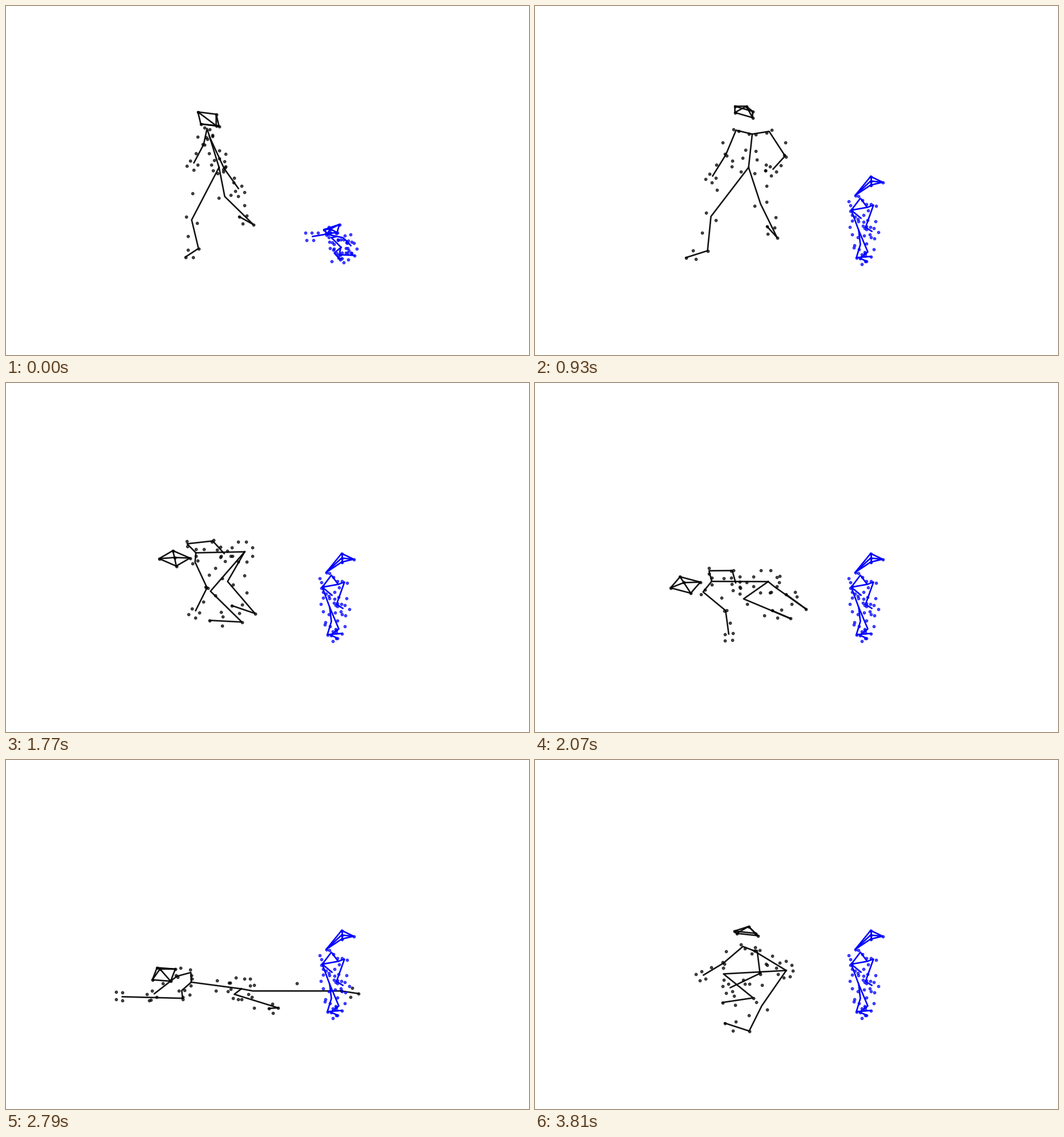
Write a matplotlib script that moves like this. It is 917 px wide and 611 px high and loops after 3.84 s.

```python
import numpy as np
import matplotlib.pyplot as plt
from matplotlib.animation import FuncAnimation
from matplotlib.collections import LineCollection

W, H, DPI = 917, 611, 100
FRAMES, STEP = 128, 30
KEYS = (0, 14, 31, 59, 79, 107, 127)
RISE = 10       # steps the blue figure needs to stand up


def track(*pts, via=None):
    """Smooth path of one joint through its key positions."""
    key = {k: np.array(p, float) for k, p in zip(KEYS, pts)}
    bend = key[59] - key[31]
    key[37] = key[31] + 0.06 * bend      # stand, then drop late
    key[54] = key[31] + 0.55 * bend
    key.update({k: np.array(p, float) for k, p in (via or {}).items()})
    t = np.array(sorted(key), float)
    p = np.array([key[k] for k in t])
    v = np.gradient(p, t, axis=0)
    f = np.arange(FRAMES)
    i = np.clip(np.searchsorted(t, f, side="right") - 1, 0, len(t) - 2)
    h = (t[i + 1] - t[i])[:, None]
    u = (f[:, None] - t[i][:, None]) / h
    return (p[i] * (1 + 2 * u) * (1 - u) ** 2 + v[i] * h * u * (1 - u) ** 2
            + p[i + 1] * u * u * (3 - 2 * u) + v[i + 1] * h * u * u * (u - 1))


def rise(low, tall):
    """Path of one joint from crouched to upright, then still."""
    u = np.clip(np.arange(FRAMES) / RISE, 0, 1)[:, None]
    u = u * u * (3 - 2 * u)
    return np.array(low) * (1 - u) + np.array(tall) * u


def complete(j):
    """Add the joints that follow from the others."""
    mid = (j["shA"] + j["shB"]) / 2
    j.setdefault("neck", mid + 0.09 * (j["pelvis"] - mid))
    j.setdefault("spine", (j["neck"] + j["pelvis"]) / 2)
    j.setdefault("h4", j["h1"] + j["h3"] - j["h2"])
    return j


black = complete({
    "h1": track((336, 185), (367, 188), (350, 175), (268, 307), (237, 368), (293, 373), (349, 299)),
    "h2": track((368, 189), (403, 182), (381, 184), (292, 293), (248, 351), (306, 353), (386, 303)),
    "h3": track((373, 210), (410, 201), (381, 195), (322, 306), (278, 355), (335, 356), (390, 307)),
    "hub": track((368, 209), (388, 188), (370, 175), (295, 305), (253, 351), (308, 357), (374, 291)),
    "pelvis": track((373, 282), (363, 286), (374, 282), (418, 295), (384, 403), (446, 374), (440, 368)),
    "shA": track((352, 214), (366, 222), (352, 217), (317, 281), (307, 360), (346, 360), (364, 326)),
    "elA": track((346, 242), (330, 189), (334, 260), (362, 276), (313, 382), (301, 353), (330, 355)),
    "wrA": track((329, 274), (342, 145), (311, 297), (382, 298), (284, 409), (262, 384), (295, 376)),
    "shB": track((357, 230), (418, 239), (410, 219), (331, 313), (286, 391), (347, 388), (389, 333)),
    "elB": track((382, 284), (440, 283), (438, 262), (352, 358), (342, 408), (298, 408), (394, 373)),
    "wrB": track((407, 319), (418, 294), (417, 285), (332, 398), (351, 437), (244, 414), (342, 398),
                 via={95: (195, 412)}),
    "knA": track((325, 374), (294, 370), (308, 368), (358, 364), (360, 397), (432, 418), (397, 430)),
    "anA": track((337, 424), (286, 428), (302, 428), (413, 418), (447, 412), (478, 459), (375, 474)),
    "toA": track((314, 439), (245, 442), (264, 440), (356, 415), (449, 394), (432, 476), (332, 460)),
    "knB": track((383, 333), (384, 347), (395, 346), (388, 347), (457, 373), (383, 420), (330, 374)),
    "anB": track((433, 382), (401, 410), (424, 405), (436, 403), (548, 390), (471, 424), (382, 416),
                 via={84: (596, 392)}),
    "toB": track((408, 368), (385, 386), (406, 385), (395, 389), (544, 361), (481, 447), (328, 424),
                 via={84: (613, 376)}),
})

blue = complete({
    "h1": rise((584, 382), (588, 298)), "h2": rise((580, 396), (609, 308)),
    "h3": rise((563, 398), (588, 313)), "h4": rise((557, 391), (561, 331)),
    "hub": rise((568, 390), (588, 306)),
    "neck": rise((580, 403), (582, 352)), "spine": rise((570, 405), (554, 357)),
    "pelvis": rise((587, 422), (567, 392)),
    "shA": rise((566, 400), (570, 336)), "elA": rise((561, 399), (554, 357)),
    "wrA": rise((537, 403), (571, 371)),
    "shB": rise((590, 405), (593, 348)), "elB": rise((598, 412), (579, 387)),
    "wrB": rise((604, 419), (590, 394)),
    "knA": rise((575, 432), (583, 430)), "anA": rise((585, 443), (569, 441)),
    "toA": rise((588, 441), (580, 446)),
    "knB": rise((585, 428), (570, 417)), "anB": rise((585, 435), (563, 440)),
    "toB": rise((610, 436), (588, 438)),
})

CHAINS = [c.split() for c in (
    "h1 h2 h3 h4 h1", "h1 hub h3", "h2 hub h4",
    "wrA elA shA neck shB elB wrB", "neck spine pelvis",
    "pelvis knA anA toA", "pelvis knB anB toB")]
KNOBS = "h1 h2 h3 h4 hub anA toA anB toB".split()


def markers(j, f):
    """Dots on the joints and loosely around the bones."""
    pts = [j[n][f] for n in KNOBS]

    def put(a, b, t, side, along=0):
        d = j[b][f] - j[a][f]
        e = d / max(np.hypot(*d), 1)
        pts.append(j[a][f] + d * t + e * along + np.array([-e[1], e[0]]) * side)

    def pair(a, b, t, r):
        put(a, b, t, r)
        put(a, b, t, -r)

    for s, g in (("A", 1), ("B", -1)):
        sh, el, wr, kn, an, to = (n + s for n in ("sh", "el", "wr", "kn", "an", "to"))
        pair(sh, el, 0, 5)
        put(sh, el, 0.62, 13 * g)
        pair(el, wr, 0, 2)
        put(el, wr, 0.55, 5 * g)
        for along in (0, 11):
            pair(el, wr, 1, 7)if along == 0 else [put(el, wr, 1, r, along) for r in (-5, 8)]
        put("pelvis", kn, 0.6, 20 * g)
        pair("pelvis", kn, 1, 11)
        put(kn, an, 0.5, 13 * g)
        pair(an, to, 0.6, 8)
    pair("neck", "spine", 0, 6)
    pair("neck", "spine", 1, 9)

    # waist ring, narrower when the body turns sideways
    turn = np.clip(np.hypot(*(j["shA"][f] - j["shB"][f])) / 58, 0.4, 1)
    for a in np.arange(8) * np.pi / 4 + 0.4:
        put("spine", "pelvis", 0.9 + 0.45 * np.cos(a), 32 * turn * np.sin(a))
    return np.array(pts)


fig = plt.figure(figsize=(W / DPI, H / DPI), dpi=DPI, facecolor="white")
ax = fig.add_axes([0, 0, 1, 1])
ax.set_xlim(-0.5, W - 0.5)
ax.set_ylim(H - 0.5, -0.5)
ax.axis("off")


def add_body(joints, color, alpha):
    bones = LineCollection([], colors=color, linewidths=1.9, alpha=alpha,
                           capstyle="projecting", joinstyle="round", zorder=2)
    ax.add_collection(bones)
    dots = ax.scatter([], [], s=10, c=color, linewidths=1, alpha=0.7, zorder=3)
    return joints, bones, dots


bodies = [add_body(black, "black", 0.92), add_body(blue, "blue", 1)]


def draw(f):
    for joints, bones, dots in bodies:
        bones.set_segments([np.array([joints[n][f] for n in c]) for c in CHAINS])
        dots.set_offsets(markers(joints, f))
    return [a for body in bodies for a in body[1:]]


anim = FuncAnimation(fig, draw, frames=FRAMES, interval=STEP,
                     repeat=True, repeat_delay=0, blit=False)
plt.show()
```
